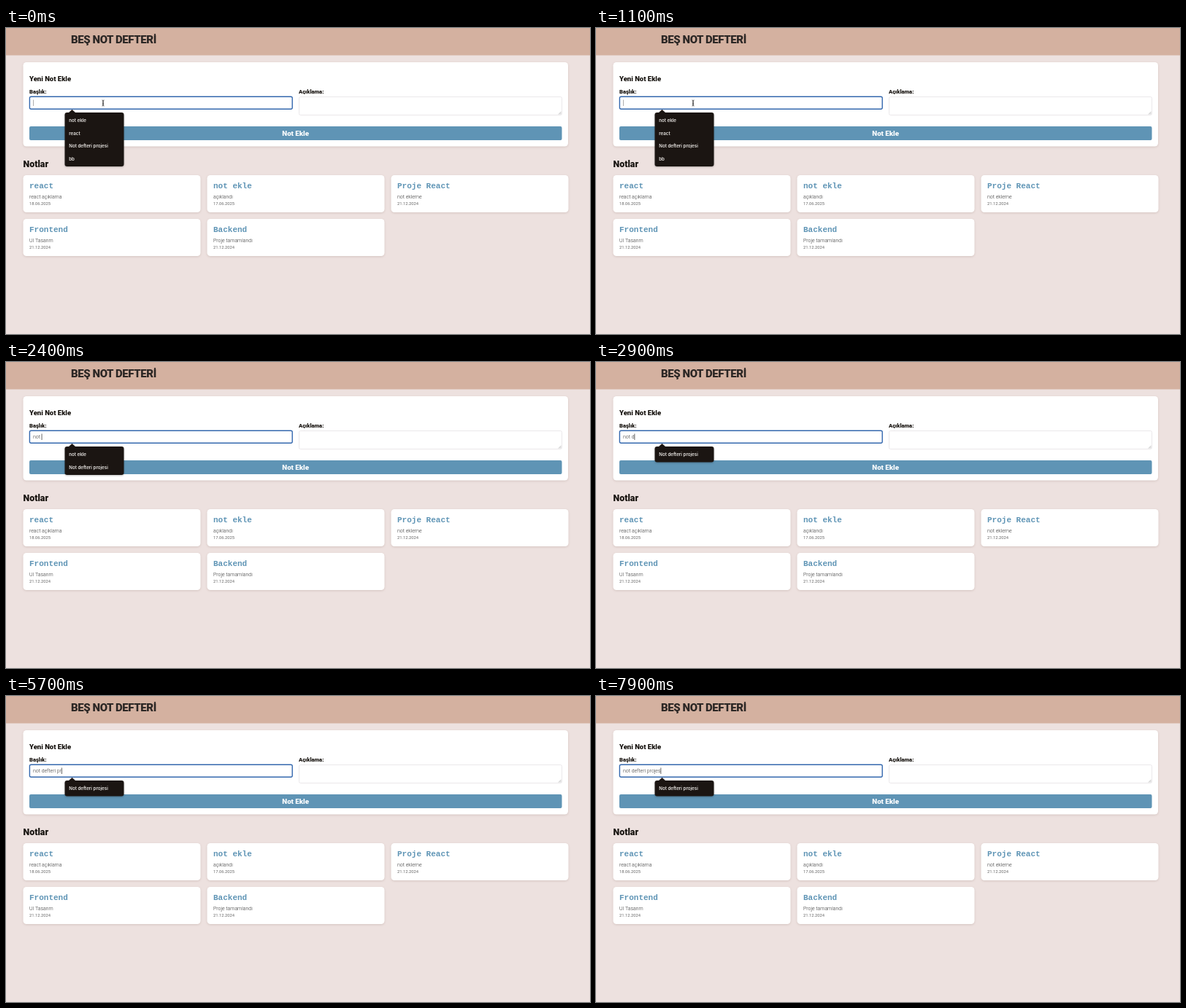
These frames come from a looping animation (800 px wide and 420 px high, 8 s). An HTML page:

```html
<!DOCTYPE html>
<html lang="tr">
<head>
<meta charset="utf-8">
<title>Not Defteri</title>
<style>
  html, body { margin: 0; width: 100%; height: 100%; overflow: hidden; background: #ede1df; }
  svg { display: block; width: 800px; height: 420px; font-family: Roboto, sans-serif; }
  text { white-space: pre; }
  .display { font-weight: 800; fill: #17130f; }
  .panel { fill: #fff; filter: drop-shadow(0 1px 1.5px rgba(90, 50, 40, .16)); }
  .card-title { font: bold 11px "Liberation Mono", monospace; fill: #5e94b5; }
  .body { font-size: 6.95px; font-weight: 300; fill: #333; }
  .date { font-size: 5.8px; fill: #666; }
  .item { font: 600 6.2px Inter, sans-serif; fill: #e9e6e3; }
  .menu { filter: drop-shadow(0 1px 1px rgba(0, 0, 0, .25)); }
</style>
</head>
<body>
<svg viewBox="0 0 800 420">
  <rect width="800" height="37.5" fill="#d4b1a0"/>
  <text class="display" x="89" y="21" font-size="15" letter-spacing="-.4" style="fill:#2c2725">BEŞ NOT DEFTERİ</text>

  <rect class="panel" x="23.5" y="47" width="746.5" height="115.5" rx="4.5"/>
  <text class="display" x="32" y="72.8" font-size="9.5">Yeni Not Ekle</text>
  <text class="display" x="32" y="90" font-size="7.6">Başlık:</text>
  <text class="display" x="401" y="90" font-size="7.6">Açıklama:</text>
  <rect x="32.4" y="94.3" width="359.8" height="17" rx="2" fill="#fff" stroke="#3468ae" stroke-width="1.4"/>
  <rect x="401.5" y="94.5" width="360" height="25" rx="2" fill="#fff" stroke="#e6e2e5" stroke-width=".8"/>
  <path d="M757 118.5l3.5-3.5M759 118.5l1.5-1.5" stroke="#888" stroke-width=".6"/>
  <rect x="32" y="135" width="729.5" height="19" rx="2" fill="#5f94b5"/>
  <text class="display" x="396.7" y="148" font-size="9.7" text-anchor="middle" style="fill:#fff">Not Ekle</text>

  <text class="display" x="23.5" y="191" font-size="12.4">Notlar</text>
  <g id="cards"></g>

  <text id="typed" class="body" x="37" y="105.3"></text>
  <rect id="caret" y="98.5" width=".8" height="8.5"/>
  <path id="pointer" d="M131.5 99q1.5 0 1.5 1v6q0 1-1.5 1M134.5 99q-1.5 0-1.5 1v6q0 1 1.5 1M132.2 104h1.6" fill="none" stroke="#333" stroke-width=".8"/>

  <g class="menu">
    <path d="M85.5 116.5L90.5 112L95.5 116.5Z" fill="#1b1512"/>
    <rect id="menu" x="80.5" y="116" width="81" rx="3.2" fill="#1b1512"/>
    <g id="items"></g>
  </g>
</svg>
<script>
  const LOOP = 8000;
  const PHRASE = 'not defteri projes';
  const KEY_TIMES = [1300, 1700, 2000, 2400, 2900, 3100, 3300, 3600, 3800,
                     4500, 4900, 5100, 5400, 5700, 6700, 7400, 7700, 7900];
  const CARET_OFF = [[500, 1000], [4100, 4500], [6100, 6500], [7100, 7400]];
  const SUGGESTIONS = ['not ekle', 'react', 'Not defteri projesi', 'bb'];
  const NOTES = [
    ['react', 'react açıklama', '18.06.2025'],
    ['not ekle', 'açıklandı', '17.06.2025'],
    ['Proje React', 'not ekleme', '21.12.2024'],
    ['Frontend', 'UI Tasarım', '21.12.2024'],
    ['Backend', 'Proje tamamlandı', '21.12.2024']
  ];

  const byId = id => document.getElementById(id);
  const label = (cls, x, y, str) => `<text class="${cls}" x="${x}" y="${y}">${str}</text>`;

  byId('cards').innerHTML = NOTES.map(([title, body, date], i) => {
    const x = 23.5 + (i % 3) * 252;
    const y = 202 + Math.floor(i / 3) * 60;
    return `<rect class="panel" x="${x}" y="${y}" width="243" height="51" rx="4.5"/>` +
      label('card-title', x + 8.5, y + 18, title) +
      label('body', x + 8.5, y + 32.2, body) +
      label('date', x + 8.5, y + 40.5, date);
  }).join('');

  const typed = byId('typed'), caret = byId('caret'), pointer = byId('pointer');
  const menu = byId('menu'), items = byId('items');
  let shown = null;

  function setText(value) {
    if (value === shown) return;
    shown = value;
    typed.textContent = value;
    caret.setAttribute('x', 37 + (value ? typed.getComputedTextLength() : 0));
    caret.setAttribute('fill', value ? '#444' : '#999');
    pointer.style.display = value ? 'none' : '';

    const matches = SUGGESTIONS.filter(s => s.toLowerCase().startsWith(value));
    menu.setAttribute('height', 4 + 17.5 * matches.length);
    items.innerHTML = matches.map((s, i) => label('item', 86.2, 129.2 + 17.6 * i, s)).join('');
  }

  function draw(now) {
    const t = now % LOOP;
    setText(PHRASE.slice(0, KEY_TIMES.filter(k => k <= t).length));
    caret.style.display = CARET_OFF.some(([from, to]) => t >= from && t < to) ? 'none' : '';
  }

  const start = performance.now();
  function tick() {
    draw(performance.now() - start);
    requestAnimationFrame(tick);
  }
  tick();
</script>
</body>
</html>
```
